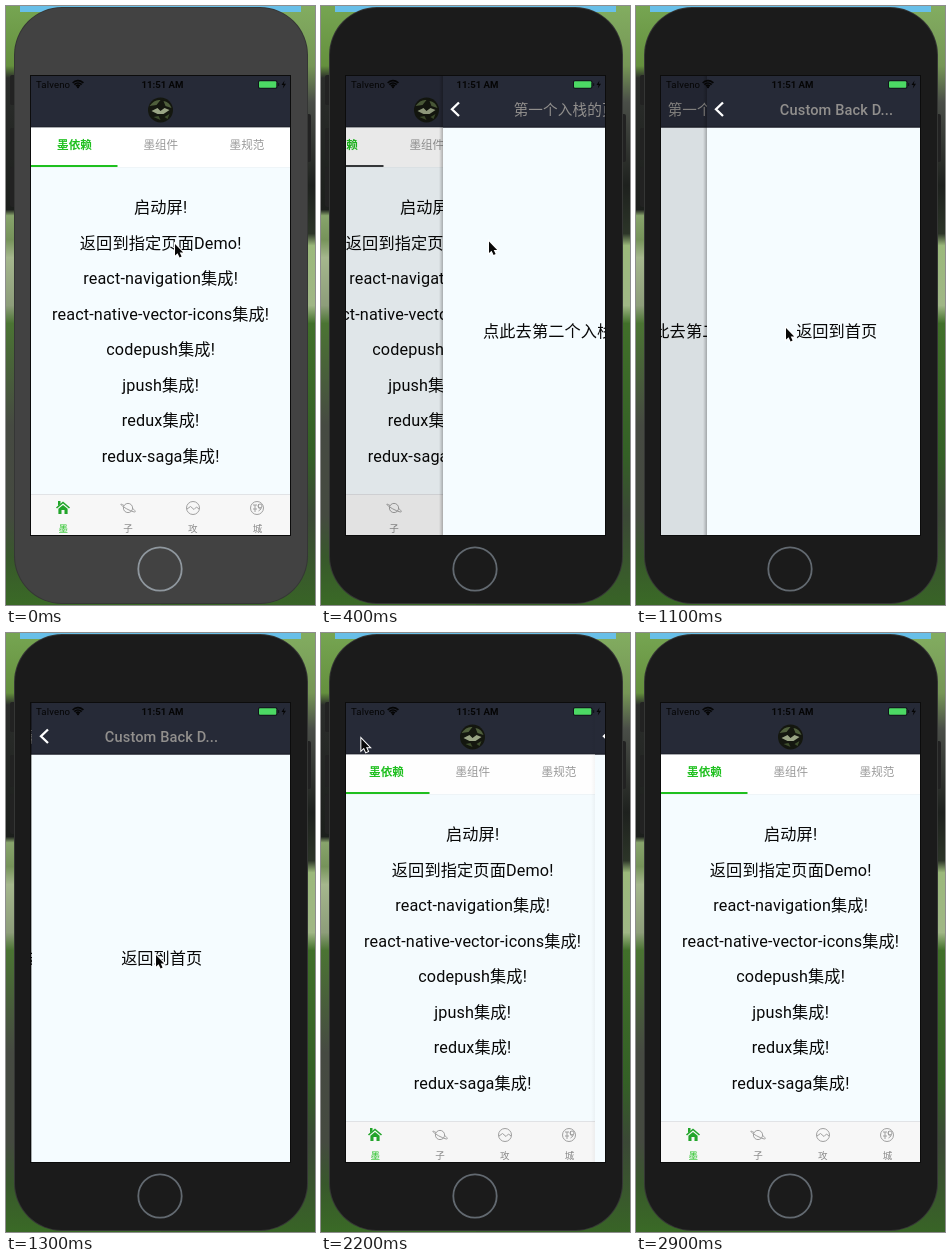
Write an HTML page with a canvas that moves like this. It is 309x599 px and loops after 3 s.

```html
<!DOCTYPE html>
<html lang="zh">
<head>
<meta charset="utf-8">
<style>
  html, body { margin: 0; height: 100%; overflow: hidden; }
  canvas { display: block; width: 309px; height: 599px; }
</style>
</head>
<body>
<canvas></canvas>
<script>
const W = 309, H = 599, LOOP = 3000, STEP = 100;
const LEFT = 25, TOP = 70, WIDTH = 259, BOTTOM = 529;
const GREEN = '#1fc01f', GREY = '#9a9a9a', BODY = '#f5fcff', NAV = '#262a37', INK = '#080808';
const FONT = 'Roboto, "Noto Sans CJK SC", "Noto Sans CJK", sans-serif';
const ROWS = ['启动屏!', '返回到指定页面Demo!', 'react-navigation集成!',
  'react-native-vector-icons集成!', 'codepush集成!', 'jpush集成!', 'redux集成!', 'redux-saga集成!'];

const canvas = document.querySelector('canvas');
const c = canvas.getContext('2d');
const dpr = window.devicePixelRatio || 1;
canvas.width = W * dpr;
canvas.height = H * dpr;
c.scale(dpr, dpr);

function rect(x, y, w, h, color, radius = 0) {
  c.fillStyle = color;
  c.beginPath();
  c.roundRect(x, y, w, h, radius);
  c.fill();
}

function circle(x, y, r, color, width) {
  c.beginPath();
  c.arc(x, y, r, 0, 7);
  if (width) { c.strokeStyle = color; c.lineWidth = width; c.stroke(); }
  else { c.fillStyle = color; c.fill(); }
}

function stroke(path, color, width) {
  c.strokeStyle = color;
  c.lineWidth = width;
  c.stroke(new Path2D(path));
}

function fill(path, color) {
  c.fillStyle = color;
  c.fill(new Path2D(path));
}

function text(s, x, y, size, color, weight = 400, align = 'center', spacing = 0) {
  c.font = `${weight} ${size}px ${FONT}`;
  c.fillStyle = color;
  c.textAlign = align;
  c.letterSpacing = spacing + 'px';
  c.fillText(s, x, y);
}

function at(x, y, draw) {
  c.save();
  c.translate(x, y);
  draw();
  c.restore();
}

function gradient(x0, y0, x1, y1, stops) {
  const g = c.createLinearGradient(x0, y0, x1, y1);
  stops.forEach(([p, color]) => g.addColorStop(p, color));
  return g;
}

const photoLeft = gradient(0, 0, 0, H, [[0, '#76a552'], [.1, '#65903e'], [.12, '#2b2d2b'], [.34, '#1c1f1c'],
  [.35, '#88a46c'], [.39, '#76935a'], [.42, '#a5b78d'], [.5, '#8d9d7a'], [.53, '#4b7433'], [.7, '#464a42'],
  [.85, '#454a40'], [.92, '#38582b'], [1, '#3a6a26']]);
const photoRight = gradient(0, 0, 0, H, [[0, '#82ad60'], [.1, '#769656'], [.16, '#4a4e48'], [.3, '#1e211e'],
  [.38, '#2c3528'], [.4, '#9bb97b'], [.5, '#a0b786'], [.53, '#41702a'], [.75, '#346026'], [.85, '#3b4836'], [1, '#386426']]);

function drawPhone(active) {
  rect(0, 0, 155, H, photoLeft);
  rect(155, 0, 154, H, photoRight);
  rect(14, 0, 281, 6, '#68bfe8');
  [[4, 69, 30], [4, 122, 32], [4, 161, 40], [299, 108, 48]].forEach(([x, y, h]) => rect(x, y, 6, h, '#222', 2));
  rect(8, 1, 294, 597, '#353635', 48);
  rect(9, 2, 292, 595, active ? '#1b1b1b' : '#424242', 47);
  rect(LEFT - 1, TOP - 1, WIDTH + 2, BOTTOM - TOP + 2, '#0c0c0c');
  circle(154, 563, 21.7, active ? '#626970' : '#8f979e', 1.8);
}

function drawCard(title) {
  rect(LEFT, TOP, WIDTH, BOTTOM - TOP, BODY);
  rect(LEFT, TOP, WIDTH, 51.5, NAV);
  rect(LEFT, 120.5, WIDTH, 1, '#1a1d27');
  if (!title) return;
  stroke('M41 96.5 L34 103.3 L41 110', '#fff', 2.3);
  text(title, 154.5, 109, 14.6, '#918f8d', 500, 'center', .12);
}

function drawAvatar() {
  at(154.5, 104, () => {
    circle(0, 0, 12.5, '#14170f');
    fill('M-11 -4 Q-6 -11 0 -10 L-4 -5 Z M3 -9 Q9 -8 11 -2 L5 -4 Z', '#4f5f3c');
    fill('M-9 1 L-3 -2 L0 1 L4 -2 L9 0 L3 4 L-3 4 Z', '#9aa585');
    fill('M-7 7 L-2 6 L0 10 Z M4 7 L9 4 L7 9 Z', '#3e4e2d');
  });
}

function drawTabIcons() {
  const gray = '#a0a0a0';
  at(57, 502, () => {
    stroke('M-6.5 0 L0 -5.5 L6.5 0', '#22a52a', 1.6);
    fill('M-5 -7 H-2.5 V-4 L-5 -2 Z M-4.6 .8 L0 -3 L4.6 .8 V6 H1.5 V2 H-1.5 V6 H-4.6 Z', '#22a52a');
  });
  at(122, 502, () => {
    circle(0, 0, 4.6, gray, 1);
    stroke('M-4 -2.5 C-10 -6 -7 -2 0 1.5 C7 5 10 5 4.3 0', gray, 1);
  });
  at(187, 502, () => {
    circle(0, 0, 6.5, gray, 1);
    stroke('M-6 1 L-2.5 -1.5 L1 1.5 L3.5 -1 L6 1', gray, 1);
  });
  at(251, 502, () => {
    circle(0, 0, 6.5, gray, 1);
    stroke('M-4 -3 H0 M-2 -3 V4 M-4 1 H0 M1.5 -4 V0 H5 M1.5 3 L4 1', gray, 1);
    circle(3, -2, 2, gray, 1);
  });
}

function drawHome(moving) {
  drawCard();
  drawAvatar();
  rect(LEFT, 121.5, WIDTH, 39.5, '#fff');
  rect(LEFT, 161, WIDTH, .6, '#e9eff1');
  rect(LEFT, 159, 86.5, 2, moving ? '#3a3c3e' : GREEN);
  text('墨依赖', 68.5, 142.5, 11.6, GREEN, 700);
  text('墨组件', 154.8, 142.5, 11.6, GREY);
  text('墨规范', 241, 142.5, 11.6, GREY);
  ROWS.forEach((row, i) => text(row, 154.6, 207.3 + i * 35.5, 16.2, INK, 400, 'center', .13));
  rect(LEFT, 488.5, WIDTH, 40.5, '#f7f7f7');
  rect(LEFT, 488, WIDTH, .8, '#dadddf');
  drawTabIcons();
  [...'墨子攻城'].forEach((s, i) => text(s, 57.3 + i * 64.7, 525.5, 9.5, i ? '#888' : GREEN, i ? 400 : 500));
}

function drawFirst() {
  drawCard('第一个入栈的页面');
  text('点此去第二个入栈的页面', 154.6, 331.3, 16.2, INK, 400, 'center', .1);
}

function drawSecond() {
  drawCard('Custom Back D...');
  text('返回到首页', 154.6, 331.3, 16.2, INK);
}

// Horizontal card stack: "shown" is how far the upper card covers the lower one.
function drawStack(lower, upper, shown) {
  const x = Math.round((1 - shown) * WIDTH);
  if (x) {
    const edge = LEFT + x;
    at(Math.round(-.3 * WIDTH * shown), 0, () => lower(shown > .05));
    rect(LEFT, TOP, WIDTH, BOTTOM - TOP, `rgba(0,0,0,${.14 * shown})`);
    rect(edge - 4, TOP, 4, BOTTOM - TOP,
      gradient(edge - 4, 0, edge, 0, [[0, 'rgba(0,0,0,0)'], [1, `rgba(0,0,0,${.25 * Math.min(1, shown * 4)})`]]));
  }
  if (shown > 0) at(x, 0, upper);
}

function drawStatus() {
  text('Talveno', 30, 82, 9.6, '#050505', 400, 'left', .15);
  text('11:51 AM', 156.5, 82, 9.6, '#050505', 700);
  [2.7, 5, 7.3].forEach(r => {
    c.beginPath();
    c.arc(72, 82, r, -Math.PI * .76, -Math.PI * .24);
    c.strokeStyle = '#050505';
    c.lineWidth = 1.7;
    c.stroke();
  });
  circle(72, 81.2, 1.1, '#050505');
  rect(252, 74.3, 19.5, 8.4, '#10131a', 2);
  rect(253, 75.2, 17.3, 6.6, '#4cd964', 1);
  rect(272, 77, 1.2, 3, '#10131a', .5);
  fill('M278.5 74.5 L275.5 79 H277.6 L276.8 82.5 L280 77.8 H277.8 Z', '#050505');
}

const cursorPath = [[0, 169, 238], [300, 168, 235], [500, 168, 236], [700, 165, 282], [900, 150, 322],
  [1400, 150, 322], [1800, 41, 105], [2000, 41, 105], [2300, 40, 106], [2600, 40, 106]];

function drawCursor(t) {
  const i = cursorPath.findIndex(p => p[0] > t);
  if (i < 0) return;
  const [t0, x0, y0] = cursorPath[i - 1], [t1, x1, y1] = cursorPath[i];
  const k = (t - t0) / (t1 - t0);
  at(x0 + (x1 - x0) * k, y0 + (y1 - y0) * k, () => {
    const arrow = 'M0 0 V11.5 L2.6 9.2 L4.6 13.5 L6.6 12.6 L4.7 8.5 H8.2 Z';
    stroke(arrow, '#fff', 2);
    fill(arrow, INK);
  });
}

const slide = (t, start) => 1 - (1 - Math.min(1, Math.max(0, (t - start) / 500))) ** 4;

function draw(t) {
  drawPhone(t >= 200);
  c.save();
  c.beginPath();
  c.rect(LEFT, TOP, WIDTH, BOTTOM - TOP);
  c.clip();
  if (t < 900) drawStack(drawHome, drawFirst, slide(t, 291));
  else if (t < 1900) drawStack(drawFirst, drawSecond, slide(t, 925));
  else drawStack(drawHome, drawSecond, 1 - slide(t, 1920));
  drawStatus();
  c.restore();
  drawCursor(t);
}

function frame(now) {
  draw(Math.floor(now % LOOP / STEP) * STEP);
  requestAnimationFrame(frame);
}
requestAnimationFrame(frame);
</script>
</body>
</html>
```
